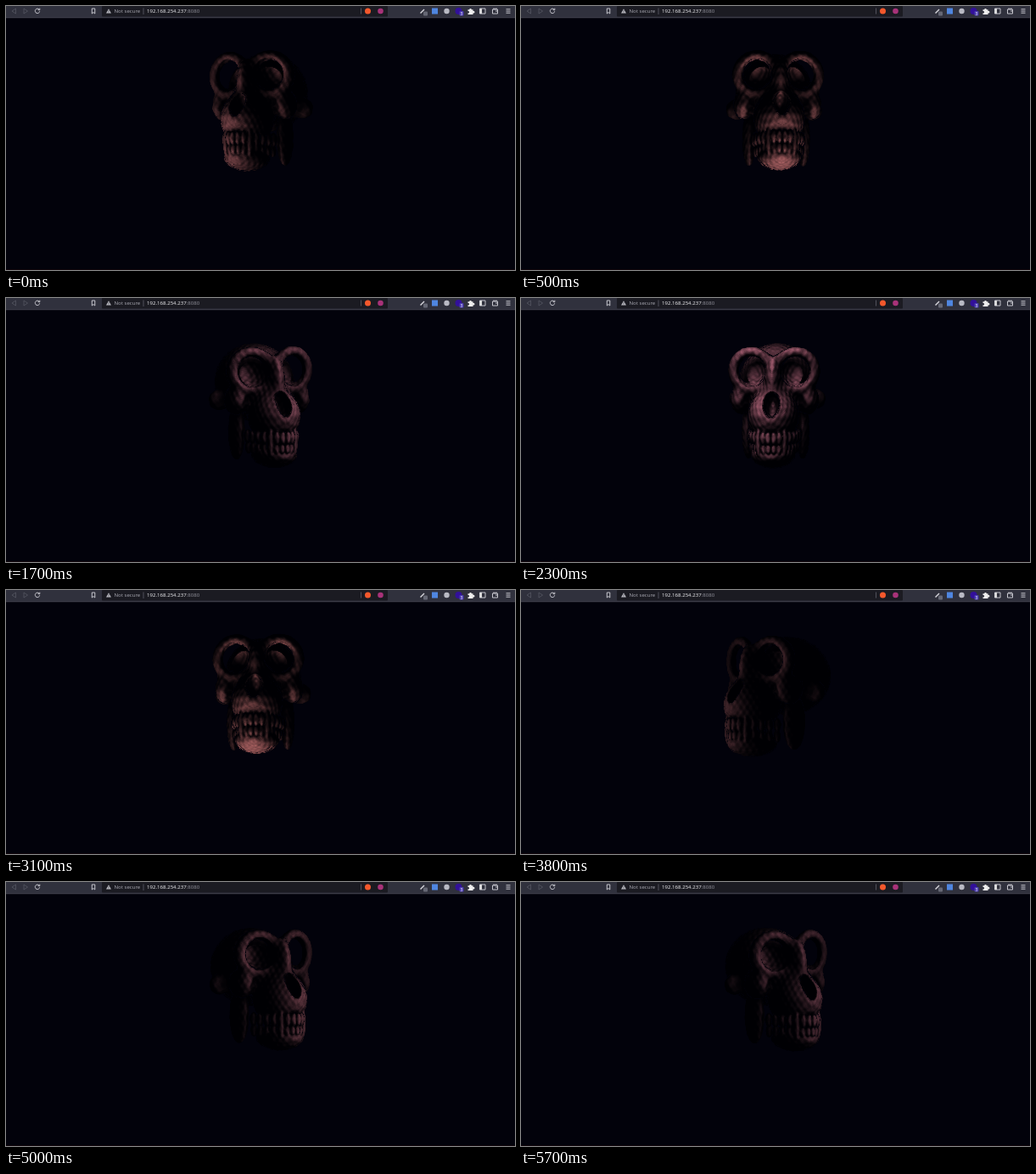
Write an HTML page with a canvas that moves like this. It is 600x311 px and loops after 5800 ms.

```html
<!DOCTYPE html>
<html lang="en">
<head>
<meta charset="utf-8">
<title>Skull</title>
<style>
  html, body { margin: 0; width: 100%; height: 100%; overflow: hidden; background: #02020b; }
  svg, canvas { position: absolute; left: 0; top: 0; }
  canvas { left: 210px; top: 36px; }
  text { font: 6.1px "Open Sans", "Noto Sans", sans-serif; }
</style>
</head>
<body>
<canvas id="view" width="180" height="176"></canvas>
<svg width="600" height="311" fill="none" stroke="#d5d5dc" stroke-width=".9">
  <g stroke="none">
    <rect width="600" height="14" fill="#30313d"/>
    <rect x="113" width="337" height="12.5" rx="1" fill="#1b1b22"/>
    <rect y="13.4" width="600" height=".8" fill="#41424c"/>
    <rect y="310" width="600" height="1" fill="#10050b"/>
    <path d="M118 8.6l3-5.4 3 5.4z" fill="#b9b9c0"/>
    <path d="M120.7 5h.6v1.7h-.6zM120.7 7.2h.6v.6h-.6z" fill="#1b1b22"/>
    <text x="127.5" y="8" fill="#a9a9b2">Not secure</text>
    <text x="166" y="8" fill="#f1f1f4">192.168.254.237<tspan fill="#92929c">:8080</tspan></text>
    <circle cx="426.500" cy="6" r="3.500" fill="#f4582c"/>
    <circle cx="441.500" cy="6" r="3.300" fill="#a83279"/>
    <rect x="502" y="2.500" width="7" height="7" fill="#4f86e0"/>
    <circle cx="519.500" cy="6" r="3.200" fill="#b9bac4"/>
    <circle cx="533.500" cy="6" r="4" fill="#32109a"/>
    <rect x="534.500" y="6" width="5" height="5.500" rx="1" fill="#4a3bb0"/>
    <text x="535.600" y="10.600" fill="#fff" style="font-size:5px">3</text>
    <rect x="492" y="6.500" width="5" height="5" rx="1" fill="#666875"/>
    <path d="M544.500 4.300h1.700a1.300 1.300 0 1 1 2.600 0h1.700v1.700a1.300 1.300 0 1 1 0 2.300v1.700h-6v-1.700a1.200 1.200 0 1 0 0-2.300z" fill="#eee"/>
    <rect x="558.500" y="3" width="2.500" height="6" fill="#ddd"/>
  </g>
  <path d="M11.500 3l-4.500 3 4.500 3zM21 3l4.500 3-4.500 3z" stroke="#5b5c67" stroke-width=".7"/>
  <path d="M39 4a2.700 2.700 0 1 0 .7 2.300M39.800 2.700v2h-2M101.300 3h3.500v6l-1.750-1.500L101.300 9z"/>
  <path d="M162 2.500v7.500M418.500 2.500v7" stroke="#777883" stroke-width=".6"/>
  <path d="M488.500 8.500l4.500-4.500" stroke-width="1.500"/>
  <path d="M558.500 3h6.500v6h-6.500zM573.500 4h6v5h-6zM577 6h3M574 3.200h5"/>
  <path d="M589.500 3.800h5M589.500 6h5M589.500 8.200h5"/>
</svg>
<script>
const { abs, min, max, sin, cos, hypot, sqrt, floor } = Math;
const LOOP = 5800, STEP = 100;
const clamp = (v, lo = 0, hi = 1) => min(hi, max(lo, v));

// Skull as a distance field: x right, y down, z toward the viewer.
function smin(a, b, k) {
  const h = max(k - abs(a - b), 0) / k;
  return min(a, b) - h * h * k / 4;
}
function ell(x, y, z, cx, cy, cz, rx, ry, rz) {
  const a = (x - cx) / rx, b = (y - cy) / ry, c = (z - cz) / rz;
  const k = sqrt(a * a + b * b + c * c);
  const g = sqrt((a / rx) ** 2 + (b / ry) ** 2 + (c / rz) ** 2);
  return g ? k * (k - 1) / g : -min(rx, ry, rz);
}
const teeth = [];
for (let i = 0; i < 7; i++) {
  const a = 0.12 + i * 0.22, x = 28 * sin(a), z = 19 + 54 * cos(a);
  teeth.push([x, i === 2 ? 47 : 42, z, 3.6, i === 2 ? 17 : 7.5, 3.8]);
  teeth.push([x * 0.93, i === 3 ? 52 : 55, z - 2, 3.3, i === 3 ? 13 : 6.5, 3.5]);
}
function field(x, y, z) {
  x = abs(x);
  let d = ell(x, y, z, 0, -18, -20, 44, 45, 55);
  const rim = hypot(hypot(x - 26, y + 35) - 22, z - 32 + 0.25 * (x - 26)) - 5.5;
  d = smin(d, rim, 10);
  d = smin(d, ell(x, y, z, 0, -25, 42, 9, 26, 16), 10);
  d = smin(d, ell(x, y, z, 40, 0, 18, 11, 16, 18), 10);
  d = smin(d, ell(x, y, z, 0, 18, 40, 29, 32, 36), 12);
  d = smin(d, ell(x, y, z, 44, 2, -22, 12, 11, 8), 6);
  d = max(d, -ell(x, y, z, 26, -35, 40, 18.5, 19.5, 30), -ell(x, y, z, 0, 2, 68, 10.5, 16, 24));
  const jaw = smin(ell(x, y, z, 0, 63, 40, 25, 15, 32), ell(x, y, z, 32, 38, 2, 7, 32, 16), 8);
  d = min(d, jaw);
  if (y > 20 && y < 76) for (const t of teeth) d = smin(d, ell(x, y, z, ...t), 1.5);
  return d + 0.5 * sin(0.55 * x) * sin(0.5 * y) * sin(0.6 * z);
}

// Sample the surface once: position, normal and tone, mirrored in x.
const cloud = [];
function sample(x, y, z) {
  const d = field(x, y, z);
  if (abs(d) > 0.65) return;
  const e = 0.6;
  let nx = field(x + e, y, z) - d, ny = field(x, y + e, z) - d, nz = field(x, y, z + e) - d;
  const len = hypot(nx, ny, nz) || 1;
  nx /= len; ny /= len; nz /= len;
  const open = r => clamp(field(x + nx * r, y + ny * r, z + nz * r) / r);
  const grain = 0.86 + 0.1 * sin(x * 0.9 + y * 0.35) * sin(z * 0.7 - y * 0.6) + 0.08 * sin(x * 37 + y * 91 + z * 53);
  const tone = grain * open(6) * (0.15 + 0.85 * open(20));
  const px = x - nx * d, py = y - ny * d, pz = z - nz * d;
  cloud.push([px, py, pz, nx, ny, nz, tone], [-px, py, pz, -nx, ny, nz, tone]);
}
for (let z = -80; z < 84; z += 4)
  for (let y = -70; y < 86; y += 4)
    for (let x = 0; x < 62; x += 4) {
      if (abs(field(x + 2, y + 2, z + 2)) > 9) continue;
      for (let i = 0; i < 64; i++) sample(x + (i & 3) + 0.5, y + (i >> 2 & 3) + 0.5, z + (i >> 4) + 0.5);
    }

// Time, turn to the side, height of the light (positive is low).
const poses = [
  [0, -0.42, 0.65], [500, 0.1, 0.8], [1100, 0.75, 0.3], [1700, 0.4, -0.6],
  [2300, -0.08, -0.65], [2700, -0.5, 0], [3100, -0.12, 0.95], [3800, -0.78, 0.3],
  [4200, -0.3, -0.5], [4600, 0.33, -0.15], [5200, 0.66, -0.3], [5700, 0.6, -0.5]
];
function pose(t) {
  const last = poses.length - 1;
  let i = 0;
  while (i < last - 1 && poses[i + 1][0] <= t) i++;
  const a = poses[max(i - 1, 0)], b = poses[i], c = poses[i + 1], d = poses[min(i + 2, last)];
  const u = clamp((t - b[0]) / (c[0] - b[0]));
  const curve = k => b[k] + 0.5 * u * (c[k] - a[k] + u * (2 * a[k] - 5 * b[k] + 4 * c[k] - d[k]
    + u * (3 * (b[k] - c[k]) + d[k] - a[k])));
  return [curve(1), curve(2)];
}

const ctx = view.getContext('2d'), W = view.width, H = view.height;
const image = ctx.createImageData(W, H);
const depth = new Float32Array(W * H), weight = new Float32Array(W * H), light = new Float32Array(W * H);

function draw(t) {
  const [yaw, low] = pose(t);
  const cy = cos(yaw), sy = sin(yaw), cp = cos(0.12 * low), sp = sin(0.12 * low);
  const turn = (x, y, z) => {
    const depthZ = z * cy - x * sy;
    return [x * cy + z * sy, y * cp - depthZ * sp, y * sp + depthZ * cp];
  };
  const lx = 2.3 * yaw - 0.12, ly = 1.3 * low, ll = hypot(lx, ly, 1);
  const gain = 1.12 - 0.95 * abs(yaw);
  depth.fill(-999); weight.fill(0); light.fill(0);

  const seen = [];
  for (const p of cloud) {
    const n = turn(p[3], p[4], p[5]);
    if (n[2] < -0.1) continue;
    const [x, y, z] = turn(p[0], p[1], p[2]);
    const lambert = max(0, (n[0] * lx + n[1] * ly + n[2]) / ll);
    const shade = lambert ** 2.2 * p[6] * gain * clamp((z + 45) / 95, 0.12, 1);
    const vx = x + 90, vy = y + 82, at = floor(vy) * W + floor(vx);
    seen.push([at, vx % 1, vy % 1, z, shade]);
    for (const k of [at, at + 1, at + W, at + W + 1]) if (z > depth[k]) depth[k] = z;
  }
  for (const [at, u, v, z, shade] of seen) {
    for (let q = 0; q < 4; q++) {
      const k = at + (q & 1) + (q >> 1) * W;
      if (z < depth[k] - 2.5) continue;
      const w = (q & 1 ? u : 1 - u) * (q >> 1 ? v : 1 - v);
      weight[k] += w;
      light[k] += w * shade;
    }
  }
  for (let k = 0; k < W * H; k++) {
    const s = weight[k] ? light[k] / weight[k] : 0;
    image.data.set([196 * s, 112 * s, (122 - 14 * low) * s + 3, 255 * min(1, weight[k] * 1.2)], k * 4);
  }
  ctx.putImageData(image, 0, 0);
}

const start = performance.now();
let shown = -1;
function tick() {
  const t = floor((performance.now() - start) % LOOP / STEP) * STEP;
  if (t !== shown) draw(shown = t);
  requestAnimationFrame(tick);
}
tick();
</script>
</body>
</html>
```
